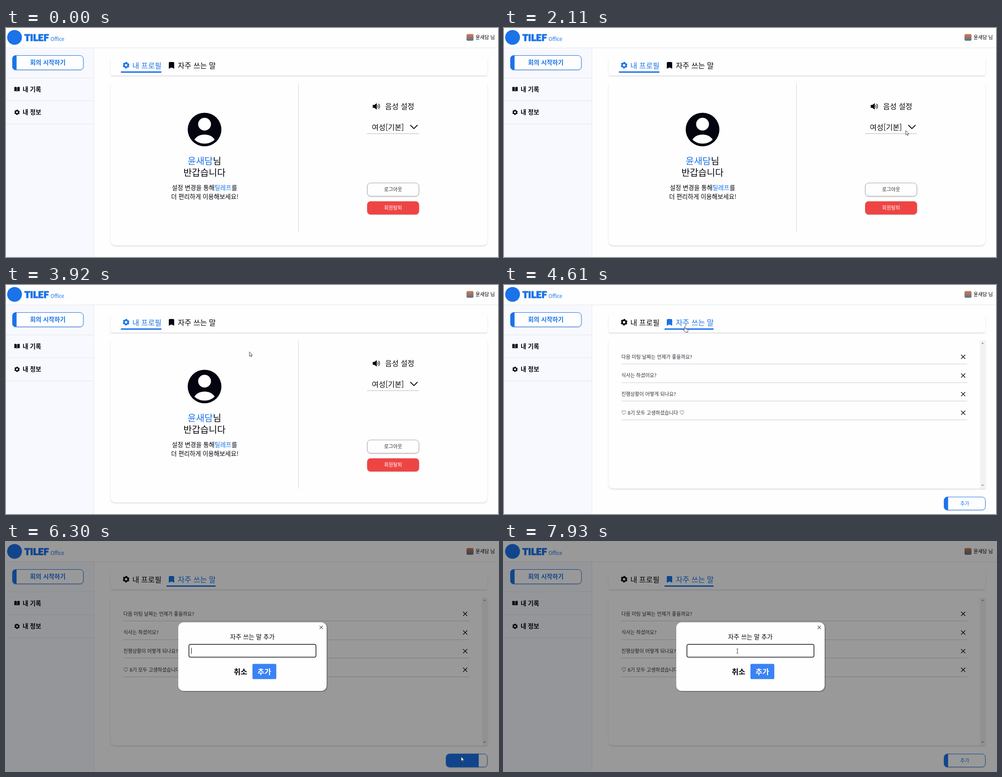
These frames come from a looping animation (1094x512 px, 8 s). An HTML page:

```html
<!DOCTYPE html>
<html lang="ko">
<head>
<meta charset="utf-8">
<title>내 정보</title>
<style>
  html, body { margin: 0; width: 100%; height: 100%; overflow: hidden; background: #fefefe; }
  svg { display: block; width: 1094px; height: 512px; }
  text { font: 400 10.88px "Noto Sans CJK KR", "Noto Sans CJK", "Noto Sans KR", "Noto Sans", sans-serif; fill: #05060f; white-space: pre; }
  .t14 { font-size: 13.6px; }
  .t17 { font-size: 16.35px; }
  .t21 { font-size: 20.4px; }
  .medium { font-weight: 500; }
  .bold { font-weight: 700; }
  .mid { text-anchor: middle; }
  .blue { fill: #1a73e8; }
  .white { fill: #fff; }
  .soft { fill: #2b2d36; }
  .brand { font: 900 21px Lato, sans-serif; fill: #1a73e8; stroke: #1a73e8; stroke-width: 1.2; stroke-linejoin: round; }
  .card { fill: #fefefe; filter: drop-shadow(0 2px 1.6px rgba(0, 0, 0, .13)); }
  .raised { filter: drop-shadow(0 1.5px 1.2px rgba(0, 0, 0, .19)); }
  .rule { stroke: #e3e5ea; fill: none; }
  .line { stroke: #c9ccd2; fill: none; }
  .stroke { stroke: #05060f; fill: none; stroke-width: 1.35; }
  .outline { fill: #fefefe; stroke: #1a73e8; }
  .tab { color: #05060f; }
  .tab rect { visibility: hidden; }
  .tab text, .tab path { fill: currentColor; }
  .tab.on { color: #1a73e8; }
  .tab.on rect { visibility: visible; fill: #1a73e8; }
  .pointer { fill: #fff; stroke: #2b2d38; stroke-width: .9; stroke-linejoin: round; }
</style>
</head>
<body>
<svg viewBox="0 0 1094 512">
  <defs>
    <g id="gear" fill="none" stroke="currentColor">
      <circle r="4.4" stroke-width="3.4"/>
      <circle r="6.3" stroke-width="2.2" stroke-dasharray="3.6 3" stroke-dashoffset="-1.5"/>
    </g>
    <path id="cross" d="M-4.6-4.6 4.6 4.6M4.6-4.6-4.6 4.6"/>
    <clipPath id="startClip"><rect x="14" y="61" width="158.5" height="33" rx="8"/></clipPath>
    <clipPath id="addClip"><rect x="978.3" y="473.5" width="92.5" height="30" rx="8"/></clipPath>
    <linearGradient id="photo" x2="0" y2="1"><stop stop-color="#d9774b"/><stop offset="1" stop-color="#54718d"/></linearGradient>
  </defs>

  <rect width="1094" height="512" fill="#fefefe"/>
  <rect y="44" width="195" height="468" fill="#f8f9fe"/>
  <path class="rule" d="M0 44.5H1094M195.5 44V512M0 111.5H195M0 162.5H195M0 214.5H195"/>

  <circle cx="19" cy="21" r="16.5" class="blue"/>
  <text class="brand" x="41" y="29">TILEF</text>
  <text class="blue" x="99" y="29" style="font-size:11.3px">Office</text>
  <rect x="1024" y="13.5" width="15.5" height="15" rx="3" fill="url(#photo)"/>
  <text class="medium" x="1044" y="25">윤새담 님</text>

  <g class="raised">
    <rect class="outline" x="14.5" y="61.5" width="157.5" height="32" rx="7.5"/>
    <rect class="blue" x="14" y="61" width="9.5" height="33" clip-path="url(#startClip)"/>
  </g>
  <text class="t14 bold mid blue" x="93" y="82">회의 시작하기</text>
  <path d="M18.5 132Q22 131 24 132.6V142Q21.5 140.6 18.5 141.4ZM30.5 132Q27 131 25 132.6V142Q27.5 140.6 30.5 141.4Z" fill="#05060f"/>
  <text class="t14 bold" x="37" y="142">내 기록</text>
  <use href="#gear" transform="translate(24.5 188.5) scale(.8)" color="#05060f"/>
  <text class="t14 bold" x="37" y="193.3">내 정보</text>

  <rect class="card" x="232.5" y="66" width="838" height="40" rx="4"/>
  <g class="tab" id="profileTab">
    <use href="#gear" x="267" y="83.2"/>
    <text class="t17" x="281" y="89.7">내 프로필</text>
    <rect x="255.5" y="97" width="90" height="3"/>
  </g>
  <g class="tab" id="phraseTab">
    <path d="M362 78.5Q362 76 364.5 76H371.5Q374 76 374 78.5V91L368 88.2 362 91Z"/>
    <text class="t17" x="382" y="89.7">자주 쓰는 말</text>
    <rect x="357" y="97" width="109" height="3"/>
  </g>

  <g id="profile">
    <path class="card" d="M232.5 124H1070.5V474Q1070.5 486 1058.5 486H244.5Q232.5 486 232.5 474Z"/>
    <path class="line" d="M650.5 124V456" stroke-opacity=".85"/>
    <circle cx="441.5" cy="227" r="37.5" fill="#03040f"/>
    <circle cx="441.5" cy="215" r="14.3" class="white"/>
    <path class="white" d="M419 249.5C424 242 432 238.3 441.5 238.3S459 242 464 249.5C458 255.5 450 258.5 441.5 258.5S425 255.5 419 249.5Z"/>
    <text class="t21 mid" x="441.3" y="304.8"><tspan class="blue">윤새담</tspan>님</text>
    <text class="t21 mid" x="441.3" y="331">반갑습니다</text>
    <text class="t14 mid" x="441.3" y="362">설정 변경을 통해<tspan class="blue">틸레프</tspan>를</text>
    <text class="t14 mid" x="442" y="382.3">더 편리하게 이용해보세요!</text>

    <path d="M815.5 172H819L824.5 168V182.5L819 178.5H815.5Z" fill="#05060f"/>
    <path class="stroke" d="M826.3 172.3Q828.6 175.2 826.3 178.2M828.3 169.5Q833.5 175.2 828.3 181"/>
    <text class="t17" x="843" y="181.4">음성 설정</text>
    <text class="t17" x="813.6" y="227.7">여성[기본]</text>
    <path class="stroke" d="M899 217 907 225 915 217" style="stroke-width:1.8"/>
    <path class="line" d="M803 236.3H918" stroke-width="1.5"/>
    <rect class="raised" x="803.5" y="346.5" width="114.5" height="29.5" rx="7.5" fill="#fefefe" stroke="#a3a6ad"/>
    <text class="mid soft" x="860.7" y="365.2">로그아웃</text>
    <rect class="raised" x="803" y="387.5" width="115.5" height="29.5" rx="7.5" fill="#ef4444"/>
    <text class="mid medium white" x="860.7" y="406.2">회원탈퇴</text>
  </g>

  <g id="phrases">
    <path class="card" d="M232.5 124H1070.5V455H244.5Q232.5 455 232.5 443Z"/>
    <rect x="1058.5" y="124" width="12" height="331" fill="#f1f1f1"/>
    <path d="M1061.5 131.5H1067L1064.3 128.5ZM1061.5 446.5H1067L1064.3 449.5Z" fill="#8b8b8b"/>
    <g id="rows"></g>
    <g class="raised">
      <rect class="outline" x="978.8" y="474" width="91.5" height="29" rx="7.5"/>
      <rect class="blue" id="fill" x="978" y="473" height="31" clip-path="url(#addClip)"/>
    </g>
    <text class="mid" id="addLabel" x="1024.5" y="492.6">추가</text>
  </g>

  <g id="modal">
    <rect width="1094" height="512" opacity=".4"/>
    <rect x="383" y="179.5" width="330" height="153.5" rx="12" fill="#fefefe" style="filter:drop-shadow(1px 1.5px 1px rgba(0,0,0,.5))"/>
    <use href="#cross" transform="translate(701 191) scale(.78)" stroke="#5c4a38" stroke-width="1.6"/>
    <text class="t14 medium mid" x="547.8" y="217.3">자주 쓰는 말 추가</text>
    <rect x="406.7" y="228.7" width="282.6" height="28.8" rx="3.5" fill="#fefefe" stroke="#111" stroke-width="1.5"/>
    <path id="caret" d="M412.5 236.5V250" stroke="#111"/>
    <text class="t17 bold mid" x="521.5" y="296.2">취소</text>
    <rect x="548" y="272.5" width="53" height="34" rx="2.5" fill="#3b82f6"/>
    <text class="t17 bold mid white" x="574.4" y="296.2">추가</text>
  </g>

  <g id="cursor">
    <circle id="click" r="9" fill="#e6d83c" opacity=".78"/>
    <path class="pointer" id="arrow" d="M0 0V9.8L2.3 7.8 3.9 11.2 5.4 10.5 3.9 7.2H6.8Z"/>
    <path class="pointer" id="hand" d="M-1 1.2Q-1 0 .1 0T1.2 1.2V5L6 6Q7.4 6.4 7.2 8L6.4 12.6H1.4L-2.8 8.2Q-3.2 6.6-1 7.4Z"/>
    <path id="beam" d="M-2-5Q0-5 0-4V4Q0 5-2 5M2-5Q0-5 0-4M0 4Q0 5 2 5" fill="none" stroke="#222" stroke-width=".9"/>
  </g>
</svg>
<script>
const LOOP = 8000, LIST_AT = 4340, MODAL_AT = 6280;
const $ = id => document.getElementById(id);
const show = (id, on) => $(id).style.display = on ? '' : 'none';
const clamp = v => Math.max(0, Math.min(1, v));
const smooth = u => u * u * (3 - 2 * u);
const ramp = (t, start, length) => smooth(clamp((t - start) / length));
const within = (v, a, b) => v >= a && v < b;

const heart = '<tspan class="bold">♡</tspan>';
$('rows').innerHTML = ['다음 미팅 날짜는 언제가 좋을까요?', '식사는 하셨어요?', '진행상황이 어떻게 되나요?', `${heart} 8기 모두 고생하셨습니다 ${heart}`]
  .map((phrase, i) => `<g transform="translate(0 ${i * 41.65})">
    <text class="soft" x="261" y="164.7">${phrase}</text>
    <use href="#cross" x="1021" y="160.7" class="stroke"/>
    <path class="line" shape-rendering="crispEdges" d="M261 176.5H1029.5"/></g>`).join('');

// Pointer stops: time, x, y
const stops = [
  [70, 700, 474], [800, 722, 395], [880, 722, 395], [1080, 946, 262], [1230, 912, 242],
  [1650, 895, 226], [2040, 895, 226], [2520, 868, 282], [3430, 868, 282], [4200, 402, 93],
  [4870, 402, 93], [5630, 928, 445], [5900, 1012, 480], [6380, 1012, 480], [7370, 519, 244]
];

function pointerAt(t) {
  const next = stops.findIndex(s => s[0] > t);
  if (next < 0) return stops[stops.length - 1].slice(1);
  const [t0, x0, y0] = stops[Math.max(0, next - 1)], [t1, x1, y1] = stops[next];
  const u = ramp(t, t0, t1 - t0);
  return [x0 + (x1 - x0) * u, y0 + (y1 - y0) * u];
}

function draw(t) {
  const list = t >= LIST_AT, modal = t >= MODAL_AT;
  show('profile', !list);
  show('phrases', list);
  show('modal', modal);
  $('profileTab').classList.toggle('on', !list);
  $('phraseTab').classList.toggle('on', list);

  const hover = ramp(t, 5700, 300) - ramp(t, 6207, 300);
  $('fill').setAttribute('width', 9.5 + 83 * hover);
  $('addLabel').style.fill = hover > .5 && !modal ? '#fff' : '#1a73e8';
  show('caret', (t - MODAL_AT) % 1000 < 500);

  const [x, y] = pointerAt(t);
  const onTab = within(x, 357, 466) && within(y, 66, 106);
  const onAdd = list && within(x, 978, 1071) && within(y, 473, 504);
  const hand = !modal && (onTab || onAdd);
  const beam = modal && within(x, 406, 690) && within(y, 228, 258);
  show('cursor', t >= 70);
  $('cursor').setAttribute('transform', `translate(${x} ${y})`);
  show('hand', hand);
  show('beam', beam);
  show('arrow', !hand && !beam);
  show('click', within(t, 4240, LIST_AT) || within(t, 6160, MODAL_AT));
}

const start = performance.now();
function tick() {
  draw((performance.now() - start) % LOOP);
  requestAnimationFrame(tick);
}
tick();
</script>
</body>
</html>
```
